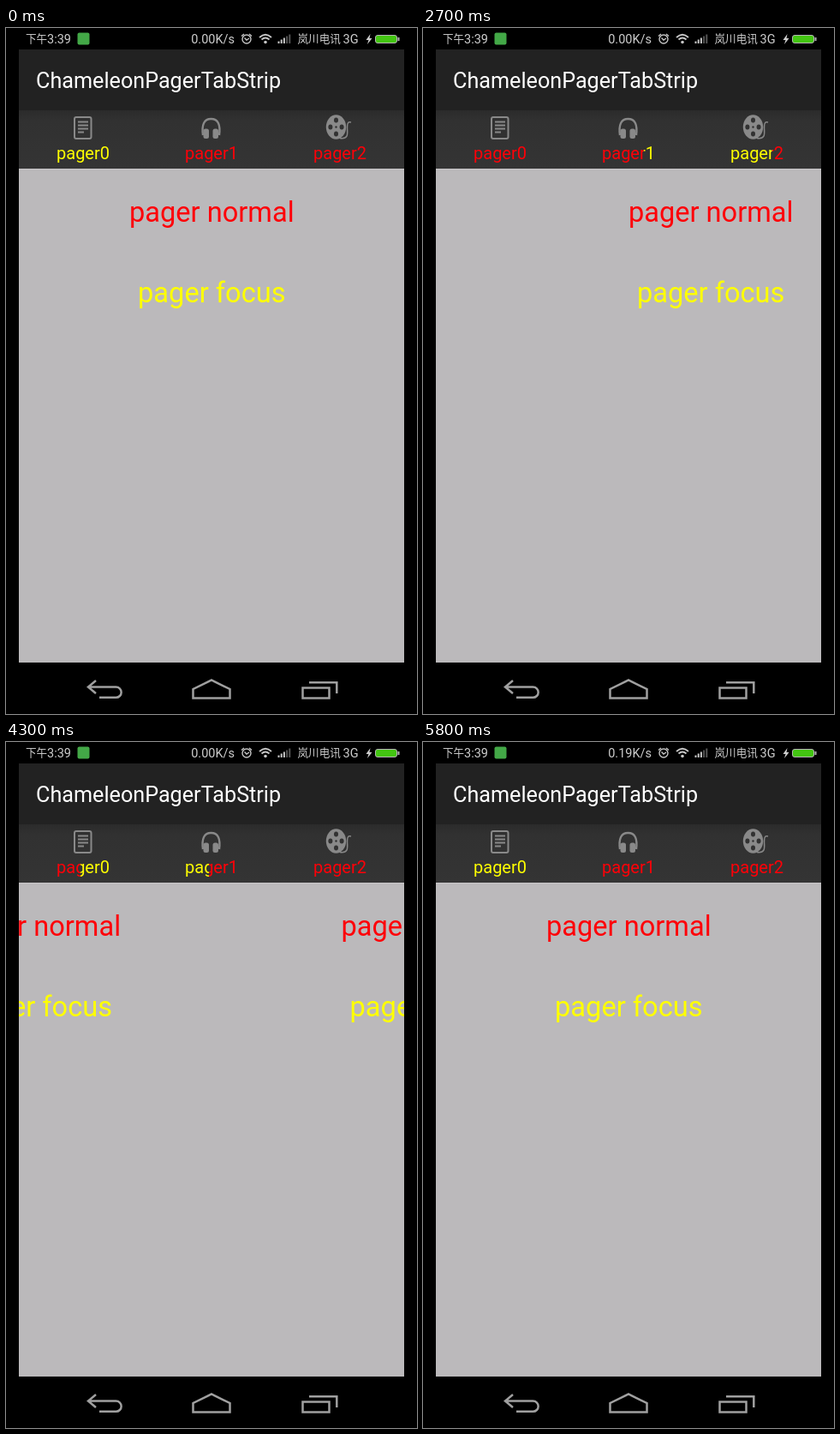
An HTML page for the animation above (5.9 s loop, 480x800 px).

```html
<!DOCTYPE html>
<html lang="zh">
<head>
<meta charset="utf-8">
<title>ChameleonPagerTabStrip</title>
<style>
  html, body { margin: 0; width: 100%; height: 100%; overflow: hidden; background: #000; }
  svg { display: block; width: 100vw; height: 100vh; }
  text { font-family: Roboto, "Noto Sans CJK SC", "Noto Sans CJK", sans-serif; white-space: pre; }
  .status { font-size: 14.5px; fill: #cecece; }
  .cjk { font-size: 12.6px; font-weight: 500; }
  .title { font-size: 25.2px; fill: #fff; }
  .tab { font-size: 20px; text-anchor: middle; }
  .page { font-size: 32.6px; text-anchor: middle; }
  .normal { fill: #ff0008; }
  .focus { fill: #ffff00; }
  .line { fill: none; stroke: #c6c6c6; stroke-width: 1.4; }
  .nav { fill: none; stroke: #a0a0a0; stroke-width: 2.5; }
</style>
</head>
<body>
<svg viewBox="0 0 480 800">
  <defs>
    <linearGradient id="strip" x2="0" y2="1">
      <stop offset="0" stop-color="#2b2b2b"/>
      <stop offset=".18" stop-color="#313131"/>
      <stop offset="1" stop-color="#343434"/>
    </linearGradient>
    <clipPath id="view"><rect x="15" y="165" width="450" height="575"/></clipPath>
  </defs>
  <rect width="480" height="800"/>

  <!-- status bar -->
  <g class="status">
    <text class="cjk" x="23" y="17">下午</text>
    <text x="48" y="17.5">3:39</text>
    <text id="speed" x="267" y="17.5" text-anchor="end">0.00K/s</text>
    <text class="cjk" x="340.5" y="17">岚川电讯</text>
    <text x="393.5" y="17.5">3G</text>
  </g>
  <rect x="83.500" y="5.500" width="14" height="14" rx="2" fill="#43a847"/>
  <g class="line">
    <circle cx="281" cy="13" r="5"/>
    <path d="M278.500 11.500L281 14L284 12M275 9.500L278 7M287 9.500L284 7"/>
    <path d="M296 11Q303 4.500 310 11M298.500 13.500Q303 9.500 307.500 13.500" stroke-width="1.8"/>
  </g>
  <circle cx="303" cy="16.500" r="1.800" fill="#c6c6c6"/>
  <g id="signal"></g>
  <path d="M425.500 7L420.500 14H423.500L422 19L427.500 12H424.500Z" fill="#d0d0d0"/>
  <rect x="431.500" y="8.500" width="25" height="9" rx="2.500" fill="#43c512" stroke="#b5b5b5"/>
  <rect x="457.500" y="11" width="2" height="4" fill="#b5b5b5"/>

  <!-- action bar and tab strip -->
  <rect x="15" y="25" width="450" height="71" fill="#222"/>
  <text class="title" x="35" y="70">ChameleonPagerTabStrip</text>
  <rect x="15" y="96" width="450" height="68" fill="url(#strip)"/>
  <g fill="none" stroke="#898989" stroke-width="2">
    <rect x="80" y="104" width="19.500" height="25" rx="2"/>
    <path d="M84 109.500H96M84 113.500H96M84 117.500H96M84 121.500H91"/>
    <path d="M230 125Q227.500 106 239.500 106T249 125" stroke-width="2.400"/>
    <path d="M390 128.500C401 130 398.500 122 398.500 116S400 109 403 110" stroke-width="1.500"/>
  </g>
  <g fill="#898989">
    <rect x="230.500" y="117.500" width="6.500" height="11.500" rx="2.500"/>
    <rect x="241.500" y="117.500" width="6.500" height="11.500" rx="2.500"/>
    <ellipse cx="385.500" cy="115.500" rx="11.700" ry="14.300"/>
  </g>
  <g id="holes" fill="#323232"></g>
  <g id="tabs"></g>

  <!-- pager -->
  <rect x="15" y="164" width="450" height="576" fill="#bbb9bb"/>
  <rect x="15" y="164" width="450" height="1" fill="#c8c6c8"/>
  <g clip-path="url(#view)"><g id="pages"></g></g>

  <!-- navigation bar -->
  <g class="nav">
    <path d="M105 761L96 768.500L105 776M96 768.500H128.500A6 6 0 0 1 128.500 780.800H109"/>
    <path d="M218.500 781.500V771L240 760.500L261.500 771V781.500Z"/>
    <path d="M346.500 769.500H377.500V781.500H346.500ZM354 763.300H386.300V776"/>
  </g>
</svg>
<script>
  const LOOP = 5900, STEP = 100, PAGE = 450, TAB = 150, LABEL = 62, SETTLE = 0.25;
  const $ = id => document.getElementById(id);

  // [start, position, resting position]: drags hold, released pages settle
  const moves = [
    [0, 0, 0], [1000, 0.062, 0.062], [1500, 0.3, 1],
    [2400, 1.03, 1.03], [2500, 1.16, 1.16], [2700, 1.787, 2],
    [3100, 1.93, 1.93], [3200, 1.73, 1.73], [3300, 1.35, 1],
    [3600, 0.938, 0.938], [3900, 0.182, 0],
    [4200, 0.06, 0.06], [4300, 0.45, 1], [4600, 1.2, 1.2], [4700, 1.809, 2],
    [5000, 1.85, 1.85], [5100, 1.4, 1], [5400, 0.9, 0.9], [5500, 0.55, 0.55],
    [5600, 0.2, 0], [5800, 0, 0]
  ];

  const range = (n, fn) => Array.from({ length: n }, (_, i) => fn(i)).join("");

  $("signal").innerHTML = range(5, i =>
    `<rect x="${317.5 + i * 3.2}" y="${15.5 - i * 2}" width="2" height="${2.5 + i * 2}" fill="${i < 3 ? "#c6c6c6" : "#555"}"/>`);

  $("holes").innerHTML = range(4, i => {
    const a = i * Math.PI / 2;
    return `<ellipse cx="${385.5 + 6.6 * Math.cos(a)}" cy="${115.5 + 8 * Math.sin(a)}" rx="2.5" ry="3"/>`;
  }) + '<circle cx="385.5" cy="115.5" r="1.2"/>';

  $("tabs").innerHTML = range(3, i => {
    const label = (kind, clip) => `<text class="tab ${kind}" x="${90 + i * TAB}" y="153" ${clip}>pager${i}</text>`;
    return `<clipPath id="red${i}"><rect y="130" height="34"/><rect y="130" height="34"/></clipPath>
      <clipPath id="lit${i}"><rect y="130" height="34"/></clipPath>` +
      label("normal", `clip-path="url(#red${i})"`) + label("focus", `clip-path="url(#lit${i})"`);
  });

  $("pages").innerHTML = range(3, i =>
    `<text class="page normal" x="${240.3 + i * PAGE}" y="226">pager normal</text>
     <text class="page focus" x="${240.3 + i * PAGE}" y="320">pager focus</text>`);

  function position(t) {
    const [start, from, rest] = moves.findLast(m => m[0] <= t);
    return rest + (from - rest) * SETTLE ** ((t - start) / STEP);
  }

  function span(rect, from, to) {
    rect.setAttribute("x", from);
    rect.setAttribute("width", Math.max(0, to - from));
  }

  function draw(t) {
    const pos = position(t);
    $("pages").setAttribute("transform", `translate(${-pos * PAGE} 0)`);
    for (let i = 0; i < 3; i++) {
      const q = Math.max(-1, Math.min(1, pos - i));
      const left = 90 + i * TAB - LABEL / 2;
      const a = left + Math.max(0, q) * LABEL;
      const b = left + Math.min(1, 1 + q) * LABEL;
      const [before, after] = $("red" + i).children;
      span($("lit" + i).firstElementChild, a, b);
      span(before, left - 2, a);
      span(after, b, left + LABEL + 2);
    }
    $("speed").textContent = t >= 5300 ? "0.19K/s" : "0.00K/s";
  }

  const origin = performance.now();
  function tick() {
    const t = (performance.now() - origin) % LOOP;
    draw(Math.floor(t / STEP) * STEP);
    requestAnimationFrame(tick);
  }
  tick();
</script>
</body>
</html>
```
